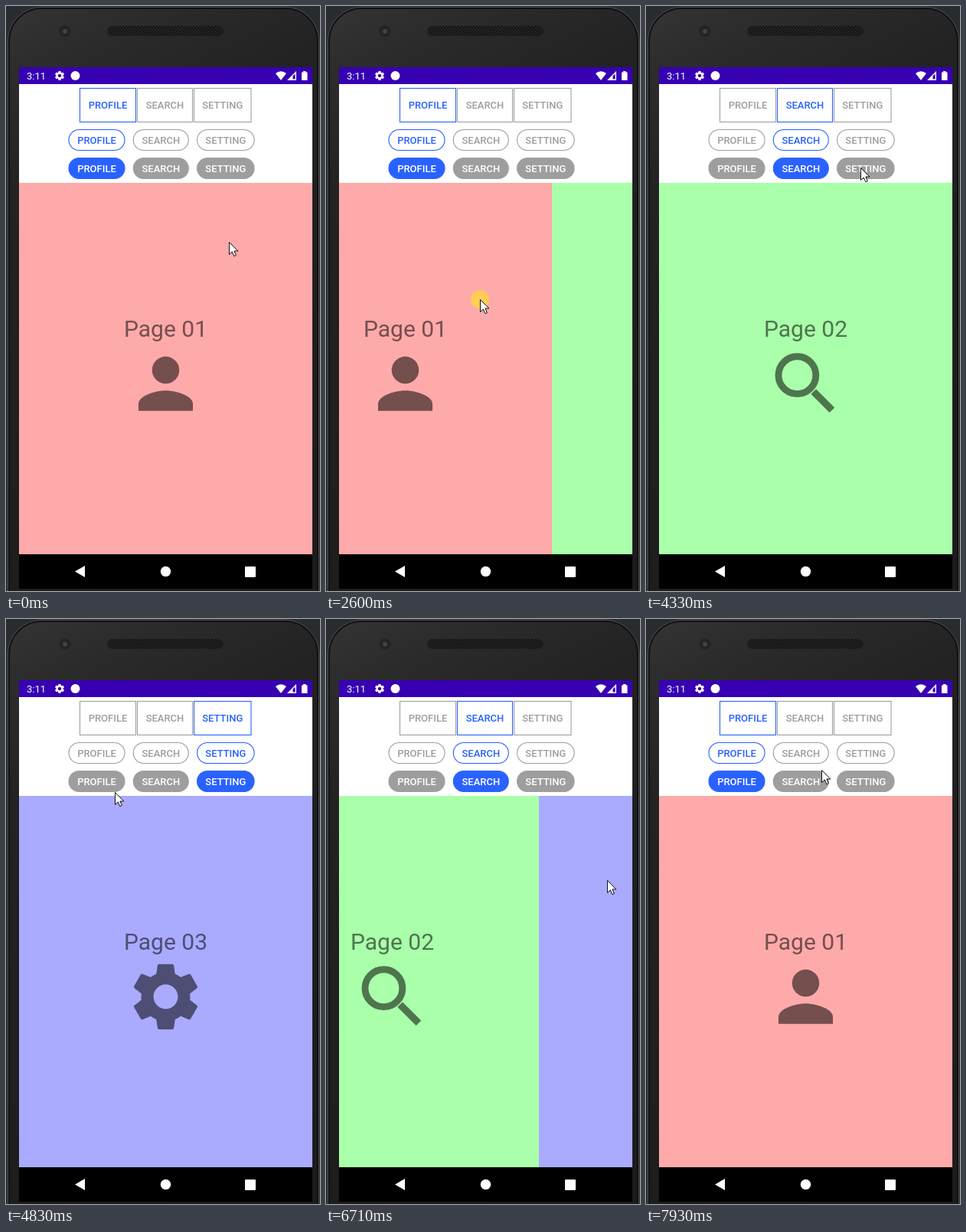
Write an HTML page that moves like this. It is 410 px wide and 764 px high and loops after 8 s.

```html
<!DOCTYPE html>
<html lang="en">
<head>
<meta charset="utf-8">
<title>Pager tabs</title>
<style>
html, body { margin: 0; width: 100%; height: 100%; overflow: hidden; background: #292c2e; }
svg { display: block; width: 410px; height: 764px; font-family: Roboto, sans-serif; }
.tab { font-size: 13px; font-weight: 500; text-anchor: middle; --c: #9e9e9e; }
.tab.on { --c: #2962ff; }
.tab rect { fill: #fff; stroke: var(--c); stroke-width: 1.1; }
.tab text { fill: var(--c); }
.tab .solid { fill: var(--c); }
.tab .light { fill: #fff; }
.title { font-size: 30px; text-anchor: middle; }
</style>
</head>
<body>
<svg viewBox="0 0 410 764">
  <defs>
    <linearGradient id="body" x2=".25" y2="1">
      <stop offset="0" stop-color="#343434"/>
      <stop offset=".12" stop-color="#2b2b2b"/>
      <stop offset=".3" stop-color="#222"/>
      <stop offset="1" stop-color="#1c1c1c"/>
    </linearGradient>
    <pattern id="mesh" width="4" height="4" patternUnits="userSpaceOnUse">
      <circle cx="1" cy="1" r=".9" fill="#2b2b2b"/>
      <circle cx="3" cy="3" r=".9" fill="#2b2b2b"/>
    </pattern>
    <clipPath id="view"><rect x="17" y="231" width="383" height="485"/></clipPath>
    <g id="gear"></g>
    <g id="person">
      <circle cy="-4" r="4"/>
      <path d="M0 2c-2.67 0-8 1.34-8 4v2h16v-2c0-2.66-5.33-4-8-4z"/>
    </g>
    <g id="lens" fill="none" stroke="currentColor" stroke-width="2">
      <circle cx="-2.5" cy="-2.5" r="5.5"/>
      <path d="M2.300 2.300L7.750 7.750" stroke-width="2.100"/>
    </g>
  </defs>

  <rect x="2.500" y="1.500" width="406" height="820" rx="44" fill="url(#body)" stroke="#555253"/>
  <rect x="4" y="3" width="403" height="820" rx="42.500" fill="none" stroke="#111" stroke-width="2"/>
  <circle cx="77" cy="33" r="7.500" fill="#242424"/>
  <circle cx="77" cy="33" r="3" fill="#414345"/>
  <rect x="132" y="26" width="152" height="13" rx="6.500" fill="#141414"/>
  <rect x="132" y="26" width="152" height="13" rx="6.500" fill="url(#mesh)"/>

  <path fill="#fff" d="M17 80h383v151H17z"/>
  <path fill="#3700b3" d="M17 80h383v22H17z"/>
  <g fill="#fff" color="#fff">
    <text x="27" y="96" font-size="13">3:11</text>
    <use href="#gear" transform="translate(70 91) scale(.63)"/>
    <circle cx="90.500" cy="91" r="6"/>
    <path d="M359 97L352 88Q359 82.500 366 88z"/>
    <path d="M367 97L379 85V97z M374.500 91.500V95.500H377.600V88.400z" fill-rule="evenodd"/>
    <path d="M386 86.500h2v-1.500h3.500v1.500h2v10.500h-7.500z"/>
  </g>
  <g id="tabs"></g>
  <g id="pages" clip-path="url(#view)"></g>
  <path d="M17 716h383v45H17z"/>
  <g fill="#fff">
    <path d="M90 738.500L103 731V746z"/>
    <circle cx="208.500" cy="738.500" r="6.700"/>
    <rect x="312" y="732" width="14" height="14" rx="1"/>
  </g>
  <g id="cursor">
    <circle id="press" r="12" fill="#ffcd55"/>
    <path d="M.5 .5V16.500L4.300 13 6.800 18.700 9.300 17.600 6.900 12H11.800z" fill="#fff" stroke="#111"/>
  </g>
</svg>
<script>
const $ = id => document.getElementById(id);
const WIDTH = 383, LOOP = 8000, STEP = 70;

// Gear: a ring with six teeth
const tooth = 'M-2.85-6l.45-3.19q.05-.41.48-.41h3.84q.43 0 .48.41l.45 3.19z';
let gear = '<circle r="5.4" fill="none" stroke="currentColor" stroke-width="3.6"/>';
for (let a = 0; a < 360; a += 60) gear += `<path fill="currentColor" transform="rotate(${a})" d="${tooth}"/>`;
$('gear').innerHTML = gear;

// One button in each of the three rows
const button = (name, x, y, w, h, r, solid) =>
  `<rect x="${x}" y="${y}" width="${w}" height="${h}" rx="${r}" class="${solid ? 'solid' : ''}"/>
   <text x="${x + w / 2}" y="${y + h / 2 + 4.6}" class="${solid ? 'light' : ''}">${name}</text>`;
let boxX = 96.5, pillX = 82;
for (const [name, w] of [['PROFILE', 73], ['SEARCH', 72], ['SETTING', 74.5]]) {
  $('tabs').innerHTML += `<g class="tab">${
    button(name, boxX, 107.5, w, 44, 0) +
    button(name, pillX, 161.5, w, 27, 13.5) +
    button(name, pillX, 198.5, w, 27, 13.5, true)}</g>`;
  boxX += w + 2;
  pillX += w + 11.3;
}

const looks = [['#faa', '#754e4e', 'person'], ['#afa', '#4e754e', 'lens'], ['#aaf', '#4e4e75', 'gear']];
$('pages').innerHTML = looks.map(([back, ink, icon], i) => `<g fill="${ink}" color="${ink}">
  <rect x="17" y="231" width="${WIDTH}" height="485" fill="${back}"/>
  <text class="title" x="208.5" y="432">Page 0${i + 1}</text>
  <use href="#${icon}" transform="translate(208.5 493.3) scale(4.44)"/></g>`).join('');

// Pointer moves: from time, to time, x, y
const moves = [
  [0, 0, 291, 308], [570, 1360, 320, 395],
  [2090, 2160, 295, 394], [2160, 2520, 195, 386], [2520, 2950, 285, 350],
  [3090, 3320, 73, 289], [3320, 3910, 280, 211],
  [4330, 4830, 142, 226], [4830, 5050, 100, 224], [5060, 5540, 109, 215], [5770, 5990, 295, 265],
  [6200, 6490, 228, 310], [6490, 6710, 367, 341], [6710, 7060, 329, 346], [7350, 7930, 229, 197]];

// Pager scrolls: from time, to time, page
const scrolls = [[0, 0, 0], [2160, 2520, .305], [2520, 2880, 0], [3180, 3554, 1], [4330, 4760, 2], [6500, 7036, 0]];

const drags = [[2160, 2700], [3160, 3240], [6490, 6640]];

// Eased value at time t, advancing in steps like a screen recording
function at(list, t) {
  let value = list[0].slice(2);
  for (const [from, to, ...goal] of list) {
    if (t < from) break;
    const p = t >= to ? 1 : Math.floor((t - from) / STEP + .05) * STEP / (to - from);
    const ease = p * p * (3 - 2 * p);
    value = value.map((v, i) => v + (goal[i] - v) * ease);
  }
  return value;
}

function draw() {
  const t = performance.now() % LOOP;
  const [x, y] = at(moves, t), [pos] = at(scrolls, t);
  [...$('pages').children].forEach((p, i) =>
    p.setAttribute('transform', `translate(${Math.round((i - pos) * WIDTH)} 0)`));
  [...$('tabs').children].forEach((b, i) => b.classList.toggle('on', i === Math.round(pos)));
  $('cursor').setAttribute('transform', `translate(${Math.round(x)} ${Math.round(y)})`);
  $('press').setAttribute('opacity', drags.some(([a, b]) => t >= a && t < b) ? 1 : 0);
  requestAnimationFrame(draw);
}
draw();
</script>
</body>
</html>
```
